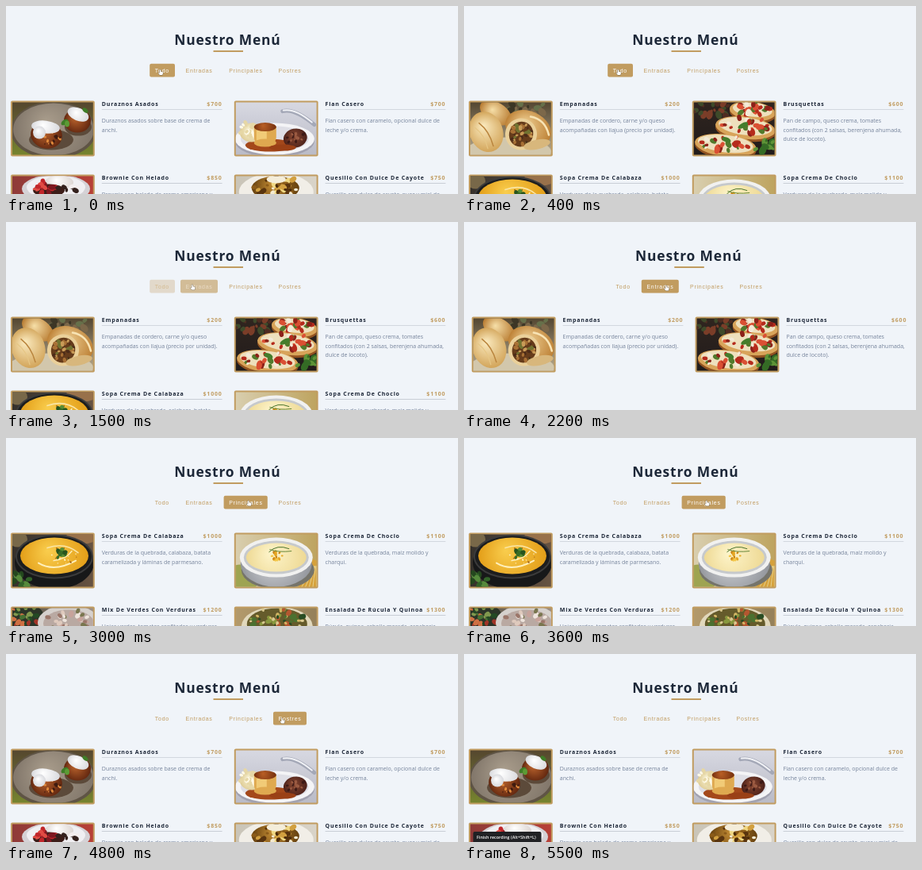
An HTML page with a canvas for the animation above (5.6 s loop, 570 by 237 pixels).

```html
<!DOCTYPE html>
<html lang="es">
<head>
<meta charset="utf-8">
<title>Nuestro Menú</title>
<style>
html, body { margin: 0; width: 100%; height: 100%; overflow: hidden; background: #f0f4f9; }
canvas { display: block; width: 570px; height: 237px; }
</style>
</head>
<body>
<canvas id="stage"></canvas>
<script>
const W = 570, H = 237, LOOP = 5600, STEP = 100;
const BG = [240, 244, 249], GOLD = [193, 156, 96], WHITE = [255, 255, 255];
const SANS = '"Open Sans", "Noto Sans", sans-serif';
const ARIAL = '"Liberation Sans", Arial, sans-serif';

const canvas = document.getElementById('stage');
const ratio = window.devicePixelRatio || 1;
canvas.width = W * ratio;
canvas.height = H * ratio;
const ctx = canvas.getContext('2d');

const rgb = c => `rgb(${c.map(Math.round).join(',')})`;
const mix = (a, b, p) => rgb(a.map((v, i) => v + (b[i] - v) * p));
const clamp = v => Math.min(1, Math.max(0, v));
const easeOut = p => 1 - (1 - p) ** 2;
const smooth = p => p * p * (3 - 2 * p);

function box(color, x, y, w, h, r = 0) {
  ctx.fillStyle = color;
  ctx.beginPath();
  ctx.roundRect(x, y, w, h, r);
  ctx.fill();
}

// Laid out at ten times the size so that advances stay fractional.
function text(str, x, y, { size, color, spacing = 0, weight = 400, family = SANS, align = 'left' }) {
  ctx.save();
  ctx.translate(x, y);
  ctx.scale(0.1, 0.1);
  ctx.font = `${weight} ${size * 10}px ${family}`;
  ctx.letterSpacing = `${spacing * 10}px`;
  ctx.textAlign = align;
  ctx.fillStyle = color;
  ctx.fillText(str, 0, 0);
  ctx.restore();
}

// Photo helpers, in a local space of 106 by 70
function oval(color, x, y, rx, ry, turn = 0) {
  ctx.fillStyle = color;
  ctx.beginPath();
  ctx.ellipse(x, y, rx, ry, turn, 0, 7);
  ctx.fill();
}

function fade(top, bottom, sideways) {
  const g = sideways ? ctx.createLinearGradient(0, 0, 106, 0) : ctx.createLinearGradient(0, 0, 0, 70);
  g.addColorStop(0, top);
  g.addColorStop(1, bottom);
  box(g, 0, 0, 106, 70);
}

function glow(light, dark, x, y, rx, ry, turn = 0) {
  const g = ctx.createRadialGradient(x - rx * 0.2, y - ry * 0.3, 0, x, y, Math.max(rx, ry));
  g.addColorStop(0, light);
  g.addColorStop(1, dark);
  oval(g, x, y, rx, ry, turn);
}

function scatter(colors, count, x, y, rx, ry, size, seed) {
  const rand = () => (seed = (seed * 16807) % 2147483647) / 2147483647;
  for (let i = 0; i < count; i++) {
    const a = rand() * 6.283, d = Math.sqrt(rand()), s = size * (0.5 + rand());
    oval(colors[i % colors.length], x + Math.cos(a) * d * rx, y + Math.sin(a) * d * ry, s, s * 0.7, a);
  }
}

function line(color, width, ...p) {
  ctx.strokeStyle = color;
  ctx.lineWidth = width;
  ctx.lineCap = 'round';
  ctx.beginPath();
  ctx.moveTo(p[0], p[1]);
  ctx.quadraticCurveTo(p[2], p[3], p[4], p[5]);
  ctx.stroke();
}

const photos = {
  peaches() {
    fade('#54452f', '#77862f');
    oval('#5f5445', 54, 37, 54, 36);
    glow('#a99d8c', '#81766a', 54, 36, 51, 33);
    oval('#5c4a3a', 51, 49, 28, 13);
    oval('#5c4a3a', 85, 33, 17, 11);
    glow('#c0672e', '#61260f', 45, 43, 20, 17, 0.2);
    glow('#c0672e', '#61260f', 84, 25, 17, 15);
    scatter(['#3f1b0f', '#e08a3c'], 18, 48, 46, 16, 10, 1.8, 11);
    glow('#ffffff', '#d9dade', 44, 33, 18, 8, 0.12);
    glow('#ffffff', '#d9dade', 36, 40, 8, 8);
    glow('#ffffff', '#d9dade', 85, 17, 14, 8, 0.4);
    oval('#3f7d27', 68, 27, 5, 3, -0.6);
    oval('#5c9b35', 71, 29, 3, 4);
    oval('#3f7d27', 94, 12, 4, 2.5, 0.7);
  },
  flan() {
    fade('#d8d9e2', '#b9bac6');
    line('#a4a8b7', 5, 61, 13, 76, 9, 101, 30);
    line('#f1f2f6', 2, 62, 12, 77, 9, 98, 27);
    oval('#a2a2b0', 51, 51, 50, 20);
    oval('#f4f4f6', 51, 48, 50, 20);
    oval('#dfdfe6', 51, 48, 43, 16);
    oval('#a4481b', 45, 56, 31, 8);
    glow('#faf5da', '#ddca91', 22, 40, 15, 12);
    scatter(['#fff9e6', '#e6d7a5'], 18, 20, 36, 13, 10, 3, 5);
    box('#dfa950', 25, 33, 28, 21, [0, 0, 8, 8]);
    box('#f1cb77', 28, 34, 13, 21, 5);
    oval('#dfa950', 39, 53, 14, 5);
    glow('#b95f24', '#75300f', 39, 33, 14, 5.5);
    glow('#8a4932', '#4a2019', 77, 47, 15, 12, -0.2);
    scatter(['#9b5b42', '#3d1a16'], 16, 77, 46, 12, 9, 2, 8);
    oval('#9a4016', 61, 59, 17, 4);
  },
  brownie() {
    fade('#8e3a38', '#b84037', true);
    oval('#d5d2d6', 57, 18, 43, 18);
    oval('#f0eff2', 57, 16, 37, 15);
    glow('#ffffff', '#ddd6d3', 61, 10, 18, 9);
    oval('#3c1d18', 48, 20, 20, 8);
    scatter(['#c1262a', '#e04c44', '#7d1820'], 16, 42, 16, 15, 8, 3.5, 21);
    scatter(['#34211d', '#f4eeee'], 9, 71, 17, 13, 7, 3, 32);
  },
  quesillo() {
    fade('#c9c4b7', '#d9d4c9', true);
    oval('#f1eee7', 53, 22, 47, 24);
    glow('#bd8732', '#65400e', 52, 17, 30, 15);
    scatter(['#59340e', '#d2a040', '#8b5b19', '#f0d884'], 36, 52, 14, 28, 13, 3.5, 17);
    oval('#f4edda', 53, 6, 12, 5);
    scatter(['#f3ead1', '#4b2b0b'], 10, 61, 19, 20, 7, 2.5, 51);
  },
  empanadas() {
    fade('#51442f', '#bcae92');
    oval('#d2c7ac', 50, 64, 54, 18);
    scatter(['#66704a', '#7c684a', '#3c3626'], 14, 74, 9, 30, 8, 4, 9);
    glow('#f6dfa8', '#b6782d', 34, 15, 22, 13, 0.55);
    glow('#fbebc0', '#d2a459', 22, 39, 21, 26, -0.35);
    line('#b9843d', 1.5, 13, 28, 26, 38, 31, 57);
    line('#e6c685', 1.3, 8, 34, 20, 43, 24, 60);
    glow('#f1d398', '#bd8136', 75, 35, 30, 22, 0.42);
    oval('#ead09a', 66, 42, 20, 20, 0.5);
    oval('#663c1b', 66, 42, 15, 16, 0.5);
    scatter(['#a87035', '#4b2b18', '#c89b57', '#717331'], 36, 66, 42, 13, 14, 2.3, 13);
    line('#f8e4b5', 2.5, 78, 20, 96, 23, 101, 43);
    oval('#d8b77c', 86, 55, 17, 6, -0.2);
  },
  toasts() {
    fade('#30251f', '#201b1b');
    scatter(['#4e2c21', '#3e4a2a', '#7a3d28'], 20, 26, 10, 30, 12, 4, 6);
    const toast = (x, y, rx, ry, seed) => {
      oval('#925321', x, y + 4, rx, ry, 0.12);
      oval('#d8a45a', x, y + 1, rx, ry, 0.12);
      oval('#eee0bd', x, y - 1, rx - 4, ry - 3, 0.12);
      scatter(['#b52b1c', '#da5033', '#8c2119', '#527a2c', '#f3ead8'], 28, x, y - 2, rx - 7, ry - 4, 3.4, seed);
    };
    toast(76, 12, 29, 12, 30);
    toast(67, 33, 38, 14, 44);
    toast(42, 55, 39, 14, 70);
    scatter(['#346b25', '#5e9337'], 12, 91, 57, 13, 9, 4, 19);
    oval('#447d2c', 64, 31, 7, 3, -0.5);
    oval('#447d2c', 43, 49, 6, 3, 0.4);
  },
  pumpkin() {
    fade('#34302b', '#685443', true);
    oval('#98714b', 90, 5, 20, 9);
    oval('#786849', 9, 8, 12, 10);
    oval('#171819', 55, 37, 50, 34);
    oval('#3b3b3b', 55, 30, 49, 28);
    oval('#1c1d1e', 55, 30, 47, 26);
    glow('#f9cd4d', '#e39e18', 55, 29, 43, 23);
    line('#fff0bc', 2, 35, 38, 55, 50, 82, 35);
    line('#fae5a4', 1.6, 46, 19, 68, 11, 85, 25);
    line('#fff0bc', 1.4, 54, 35, 70, 33, 77, 23);
    scatter(['#fff3cb', '#ab6a19'], 17, 65, 30, 20, 11, 1.1, 24);
    scatter(['#386c25', '#588d34', '#28541e'], 10, 62, 27, 7, 5, 3, 41);
    scatter(['#326329', '#568a3c', '#24471e'], 14, 12, 59, 12, 9, 4, 73);
  },
  corn() {
    fade('#d9cfb0', '#bda35e', true);
    oval('#9ea451', 8, 58, 23, 18);
    oval('#d5a13c', 96, 55, 18, 22);
    for (let i = 0; i < 7; i++) line('#e4cf8b', 1, 84 + i * 5, 70, 91 + i * 3, 58, 100 + i, 42);
    oval('#75746b', 55, 47, 46, 24);
    glow('#d7d9dd', '#92959b', 53, 39, 45, 29);
    oval('#f1f1f0', 53, 31, 46, 25);
    oval('#c6c9cc', 53, 31, 41, 21);
    glow('#fdf4ca', '#eed994', 53, 31, 38, 18);
    scatter(['#e5a622', '#f3c749', '#c98217'], 15, 53, 29, 9, 5, 2.2, 28);
    line('#49742e', 1, 44, 24, 54, 14, 69, 20);
    line('#66873a', 1, 45, 21, 56, 25, 72, 23);
  },
  greens() {
    fade('#4c4638', '#9f9186', true);
    oval('#2c3528', 19, 14, 23, 18);
    scatter(['#467133', '#a33528', '#234924', '#81994e', '#cf7043'], 34, 19, 12, 20, 14, 3, 16);
    oval('#d6d1cd', 73, 20, 39, 22);
    oval('#b9a9a2', 73, 21, 32, 17);
    scatter(['#dfcabd', '#9b7669', '#c7a39b', '#eee4dc', '#79764e'], 34, 73, 18, 28, 14, 3, 48);
  },
  quinoa() {
    fade('#b39a6b', '#94805a', true);
    oval('#e1d8bc', 54, 25, 45, 25);
    oval('#655b2b', 54, 22, 38, 20);
    scatter(['#4b7130', '#88983e', '#d2b765', '#b45730', '#294c23', '#d9c990'], 52, 54, 17, 35, 15, 3.3, 34);
  }
};

const dishes = {
  empanadas: ['Empanadas', 200, 'Empanadas de cordero, carne y/o queso', 'acompañadas con llajua (precio por unidad).'],
  toasts: ['Brusquettas', 600, 'Pan de campo, queso crema, tomates', 'confitados (con 2 salsas, berenjena ahumada,', 'dulce de locoto).'],
  pumpkin: ['Sopa Crema De Calabaza', 1000, 'Verduras de la quebrada, calabaza, batata', 'caramelizada y láminas de parmesano.'],
  corn: ['Sopa Crema De Choclo', 1100, 'Verduras de la quebrada, maíz molido y', 'charqui.'],
  greens: ['Mix De Verdes Con Verduras', 1200, 'Hojas verdes, tomates confitados y verduras'],
  quinoa: ['Ensalada De Rúcula Y Quinoa', 1300, 'Rúcula, quinoa, cebolla morada, zanahoria'],
  peaches: ['Duraznos Asados', 700, 'Duraznos asados sobre base de crema de', 'anchi.'],
  flan: ['Flan Casero', 700, 'Flan casero con caramelo, opcional dulce de', 'leche y/o crema.'],
  brownie: ['Brownie Con Helado', 850, 'Brownie con helado de crema americana y'],
  quesillo: ['Quesillo Con Dulce De Cayote', 750, 'Quesillo con dulce de cayote, nuez y miel de']
};

// Start time of each list
const views = [
  [0, ['peaches', 'flan', 'brownie', 'quesillo']],
  [300, ['empanadas', 'toasts', 'pumpkin', 'corn']],
  [1700, ['empanadas', 'toasts']],
  [2800, ['pumpkin', 'corn', 'greens', 'quinoa']],
  [4500, ['peaches', 'flan', 'brownie', 'quesillo']]
];

// Label, left edge, width, pointer enters, pointer leaves
const tabs = [
  ['Todo', 181.2, 31.8, -1000, 1365],
  ['Entradas', 220, 47, 1380, 2560],
  ['Principales', 274.6, 55.2, 2600, 3790],
  ['Postres', 337, 42, 3880, 5030]
];
const HOVER = 300;

const pointerPath = [
  [0, 194.5, 80.5], [1200, 194.5, 80.5], [1500, 235, 79], [1700, 244, 79], [2200, 255, 80],
  [2500, 255, 80], [2800, 304, 79], [3000, 306, 79], [3700, 306, 79], [4000, 348, 81],
  [4900, 348, 81], [5400, 70, 240], [LOOP, 70, 240]
];

function drawDish(key, x, y) {
  const [name, price, ...lines] = dishes[key];
  box(rgb(GOLD), x, y, 105.8, 70, 2);
  ctx.save();
  ctx.translate(x, y);
  ctx.beginPath();
  ctx.rect(2, 2, 101.8, 66);
  ctx.clip();
  photos[key]();
  ctx.restore();

  const label = { size: 7.05, spacing: 0.79, weight: 700 };
  const left = x + 114.8, right = x + 266.6;
  text(name, left, y + 6.7, { ...label, color: '#1b2536' });
  text('$' + price, right, y + 6.7, { ...label, color: rgb(GOLD), align: 'right' });
  box('#c9ced6', left, y + 10.6, right - left, 0.8);
  lines.forEach((str, i) => text(str, left, y + 27.7 + i * 11.3, { size: 7.05, color: '#74829a' }));
}

function drawTab([label, x, w, enter, leave], t) {
  const level = t < leave ? easeOut(clamp((t - enter) / HOVER)) : 1 - easeOut(clamp((t - leave) / HOVER));
  if (level > 0) box(mix(BG, GOLD, level), x, 72.8, w, 16.6, 2);
  text(label, x + 6.6, 83.7, { size: 7, spacing: 0.75, color: mix(GOLD, WHITE, level), family: ARIAL });
}

function drawPointer(t) {
  const i = pointerPath.findIndex(p => p[0] > t);
  const [t0, x0, y0] = pointerPath[i - 1], [t1, x1, y1] = pointerPath[i];
  const p = smooth((t - t0) / (t1 - t0));
  ctx.save();
  ctx.translate(x0 + (x1 - x0) * p, y0 + (y1 - y0) * p);
  ctx.beginPath();
  ctx.moveTo(-0.7, 0);
  for (const [x, y] of [[0.5, 0], [0.6, 2.2], [3.2, 2.8], [3.5, 4.3], [2.7, 6.6], [-0.6, 6.6], [-2.4, 4.3], [-1.8, 3.5], [-0.7, 4.3]]) ctx.lineTo(x, y);
  ctx.closePath();
  ctx.lineJoin = 'round';
  ctx.lineWidth = 0.7;
  ctx.strokeStyle = '#5d5344';
  ctx.fillStyle = '#fff';
  ctx.stroke();
  ctx.fill();
  ctx.restore();
}

function draw(t) {
  ctx.setTransform(ratio, 0, 0, ratio, 0, 0);
  box(rgb(BG), 0, 0, W, H);
  const keys = views.filter(v => v[0] <= t).pop()[1];

  ctx.save();
  // A short list needs no scrollbar, so the page centre moves.
  if (keys.length < 3) ctx.translate(3.8, 0);
  text('Nuestro Menú', 212.2, 49, { size: 17.5, spacing: 0.77, weight: 700, color: '#1c2738' });
  box(rgb(GOLD), 261.5, 56, 37.5, 1.9);
  tabs.forEach(tab => drawTab(tab, t));
  keys.forEach((key, i) => drawDish(key, 6 + (i % 2) * 281.8, 119.6 + (i >> 1) * 92.9));
  ctx.restore();

  if (t >= 5500) {
    box('#202124', 11.5, 224, 86, 15, 2);
    text('Finish recording (Alt+Shift+L)', 16, 233.4, { size: 5.4, weight: 600, color: '#fff' });
  }
  drawPointer(t);
}

let shown = -1;
function tick() {
  const t = Math.floor((performance.now() % LOOP) / STEP) * STEP;
  if (t !== shown) draw(shown = t);
  requestAnimationFrame(tick);
}
tick();
</script>
</body>
</html>
```
